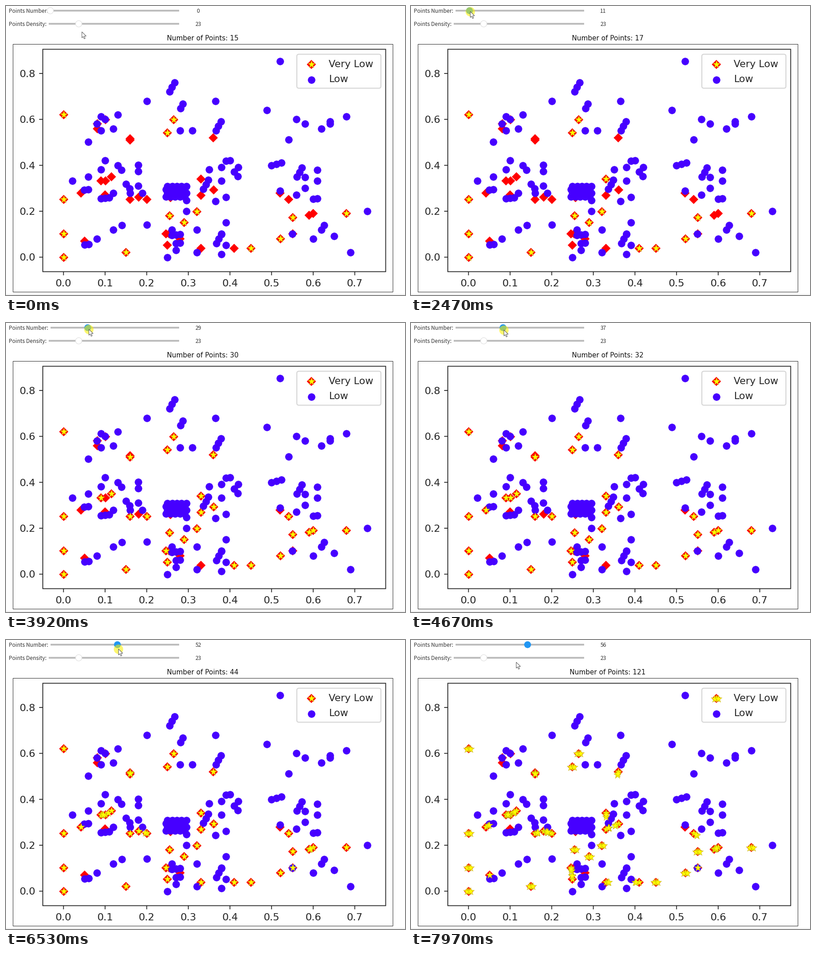
Recreate the animation shown at these times as a matplotlib script. Size 878x638 px, loop 8 s.

```python
import numpy as np
import matplotlib.pyplot as plt
from matplotlib.animation import FuncAnimation
from matplotlib.patches import Circle, FancyBboxPatch, Polygon, Rectangle

W, H, DPI = 878, 638, 64
PT = 72 / DPI  # points per pixel
STEP, LOOP = 40, 8000

RED, BLUE, YELLOW, SKY = "#ff0000", "#4600ff", "#ffff00", "#2196f3"
INK, TRACK = "#262626", "#bababa"


def trail(dx, dy, *starts):
    """From each start (x, y, n), n points one step apart."""
    return [(x + dx * k, y + dy * k) for x, y, n in starts for k in range(n)]


def to_px(points):
    p = np.array(points, float)
    return np.column_stack([126.5 + 915.7 * p[:, 0], 554.5 - 507 * p[:, 1]])


# blue points: short trails, one dense patch and lone points
blue = trail(.006, .02, (.255, .72, 3), (.366, .551, 3), (.281, .648, 2),
             (.367, .06, 3), (.561, .35, 3), (.336, .297, 3), (.62, .119, 2))
blue += trail(.01, .002, (.05, .292, 2), (.09, .255, 3), (.6, .254, 2),
              (.26, .096, 3), (.39, .42, 2), (.051, .054, 2), (.27, .06, 2))
blue += trail(.02, .02, (.08, .58, 2), (.12, .12, 2), (.62, .56, 2))
blue += trail(.009, -.02, (.13, .4, 2), (.15, .318, 2), (.41, .372, 2))
blue += trail(.012, .006, (.5, .399, 3))
blue += trail(.02, -.02, (.56, .6, 2))
blue += trail(.03, 0, (.16, .28, 2), (.28, .551, 2))
blue += trail(0, .048, (.58, .301, 2), (.61, .332, 2), (.295, .2, 2))
blue += trail(0, .028, (.18, .373, 2), (.64, .591, 1))
blue += [(x + .004 * (r % 2), .263 + .0155 * r)
         for r in range(4) for x in np.linspace(.246, .291, 5)]
blue += [
    (.52, .853), (.2, .68), (.365, .68), (.489, .64), (.68, .612),
    (.541, .511), (.13, .62), (.09, .612), (.09, .551), (.12, .56),
    (.06, .502), (.1, .421), (.09, .381), (.18, .31), (.06, .35),
    (.021, .332), (.12, .28), (.08, .079), (.2, .141), (.35, .381),
    (.38, .391), (.42, .391), (.38, .332), (.365, .244), (.39, .261),
    (.26, .119), (.27, .031), (.25, 0), (.32, .119), (.32, .021),
    (.39, .151), (.38, .102), (.39, .052), (.38, .013), (.56, .271),
    (.52, .289), (.55, .102), (.65, .092), (.6, .079), (.69, .021), (.73, .2),
]

# red points in the order their stars join
first = [(0, y) for y in (0, .102, .252, .62)] + [
    (.265, .599), (.25, .541), (.255, .181), (.29, .15), (.32, .199),
    (.15, .021), (.45, .039), (.521, .079), (.551, .172), (.68, .19),
]
joins = [
    (.33, .341), (.41, .039), (.33, .27), (.36, .519), (.361, .292),
    (.25, .052), (.541, .252), (.59, .182), (.6, .19), (.2, .252),
    (.16, .252), (.115, .35), (.09, .332), (.16, .509), (.246, .102),
    (.101, .332), (.042, .279), (.181, .261), (.16, .516), (.33, .039),
    (.551, .102),
]
last = [(.051, .071)]
plain = [(.081, .58), (.081, .559), (.101, .599), (.1, .271), (.249, .3),
         (.257, .26), (.28, .079), (.52, .279), (.254, .101)]

KEY = np.array([[672, 129]])
BASE = np.vstack([to_px(first), KEY])
TWINS = np.vstack([BASE + (dx, .5) for dx in (-4, 4)])


def between(points, n):
    """New points on the way to each point's neighbour, closest pairs first."""
    rng = np.random.default_rng(4)
    gap = np.linalg.norm(points[:, None] - points[None], axis=2)
    np.fill_diagonal(gap, np.inf)
    near, order = gap.argmin(1), gap.min(1).argsort()
    out = []
    for k in range(n):
        i = order[k % len(order)]
        reach = min(1, 10 / gap[i, near[i]])
        out.append(points[i] + (points[near[i]] - points[i])
                   * reach * rng.uniform(.3, .9))
    return np.array(out)


JOINS = to_px(joins)
STARS = np.vstack([BASE, JOINS, between(JOINS[:-1], 54), to_px(last)])

fig = plt.figure(figsize=(W / DPI, H / DPI), dpi=DPI, facecolor="white")
ax = fig.add_axes([0, 0, 1, 1])
ax.set_xlim(0, W)
ax.set_ylim(H, 0)
ax.axis("off")


def text(x, y, s, size, font="DejaVu Sans", color=INK, **kw):
    return ax.text(x, y, s, fontsize=size * PT, family=font, color=color,
                   va="baseline", **kw)


def line(xs, ys, color, width, z=1):
    ax.plot(xs, ys, color=color, lw=width * PT, zorder=z, snap=False,
            solid_capstyle="butt")


def box(x0, y0, x1, y1, width):
    ax.add_patch(Rectangle((x0, y0), x1 - x0, y1 - y0, fill=False, ec=INK,
                           lw=width * PT, snap=False, zorder=5))


def dots(xy, marker, size, color, z, edge, width):
    return ax.plot(xy[:, 0], xy[:, 1], marker=marker, ms=size * PT, ls="none",
                   color=color, mec=edge, mew=width * PT, zorder=z)[0]


def knob(x, y):
    return ax.add_patch(Circle((x, y), 7, fc="white", ec="#dcdcdc", lw=PT,
                               zorder=11))


# plot frame and ticks
box(15.5, 84.5, 851.5, 631.5, 1)
box(81, 95.5, 835.5, 586.5, 1.8)
line([0, W], [636.5, 636.5], "#e6e6e6", 1)
for i in range(8):
    x = 126.5 + 91.57 * i
    line([x, x], [587, 594.5], INK, 1.8)
    text(x, 619, f"{i / 10:.1f}", 22.2, ha="center")
for i in range(5):
    y = 554.5 - 101.4 * i
    line([73, 81], [y, y], INK, 1.8)
    text(65, y + 8, f"{i / 5:.1f}", 22.2, ha="right")

# data
reds = np.vstack([to_px(first + joins + last + plain), KEY])
dots(reds, "D", 13.4, RED, 7, RED, 1.6)
dots(np.vstack([to_px(blue), (671.5, 162.5)]), "o", 15.4, BLUE, 8, BLUE, 1)
stars = dots(BASE, "*", 17.5, YELLOW, 9, "#b39500", .5)

# legend
ax.add_patch(FancyBboxPatch((644.5, 111), 176, 66,
                            boxstyle="round,pad=4.5,rounding_size=4.5",
                            fc="white", ec="#d6d6d6", lw=2.2 * PT, zorder=6))
text(710.5, 135, "Very Low", 21.8, zorder=7)
text(710.5, 168.5, "Low", 21.8, zorder=7)

# sliders
UI = dict(font="Noto Sans CJK JP", color="#333333")
text(6, 15, "Points Number:", 11.9, **UI)
text(6, 44, "Points Density:", 11.9, **UI)
text(423, 44, "23", 11.9, ha="center", **UI)
count = text(423, 15, "0", 11.9, ha="center", **UI)
title = text(432.5, 76.5, "", 14.9, color="#111111", ha="center")
line([98, 381], [10.3, 10.3], TRACK, 3.8, 10)
line([94, 381], [39.3, 39.3], TRACK, 3.8, 10)
knob(160, 39.3)
handle = knob(97.5, 10.3)

# pointer
ARROW = np.array([(0, 0), (0, 13.2), (3, 10.4), (5, 15.4), (7.3, 14.4),
                  (5.2, 9.6), (9.4, 9.4)])
halo = ax.add_patch(Circle((0, 0), 10.3, fc="#fdf000", ec="none", alpha=.57,
                           zorder=12))
arrow = ax.add_patch(Polygon(ARROW, fc="white", ec="#555555", lw=PT,
                             joinstyle="miter", zorder=13))

DRAG = [(1230, 0), (1500, 2), (2470, 11), (3920, 29), (5490, 46),
        (6530, 52), (7200, 56)]
SHOWN = [(8, 15), (11, 17), (14, 17), (27, 30), (46, 35), (52, 44), (56, 52)]


def follow(keys, t):
    return np.interp(t, *zip(*keys))


def ease(t, a, b):
    u = np.clip((t - a) / (b - a), 0, 1)
    return u * u * (3 - 2 * u)


def pointer(t, drag):
    away, leave = 1 - ease(t, 20, 700), ease(t, 7700, 7960)
    x = 100 + 2.84 * drag + 67 * away - 27.5 * leave
    y = 12 + 9.5 * (drag / 56) ** 2.5 + 45 * away + 27.5 * leave
    return x, y


def draw(i):
    t = i * STEP
    pressed, released = t >= 1020, t >= 7480
    drag = follow(DRAG, t)
    value = int(round(drag))

    pts = STARS[:int(follow(SHOWN, value))]
    if released:
        pts = np.vstack([STARS, TWINS])
    stars.set_data(pts[:, 0], pts[:, 1])
    title.set_text(f"Number of Points: {len(pts)}")
    count.set_text(str(value))

    handle.center = (97.5 + 2.84 * value, 10.3)
    handle.set_facecolor(SKY if pressed else "white")
    handle.set_edgecolor(SKY if pressed else "#dcdcdc")
    x, y = pointer(t, drag)
    halo.center = (x, y + .5)
    halo.set_visible(pressed and not released)
    arrow.set_xy(ARROW + (x, y))
    return stars, title, count, handle, halo, arrow


anim = FuncAnimation(fig, draw, frames=LOOP // STEP, interval=STEP,
                     repeat=True, repeat_delay=0, blit=False)
plt.show()
```
